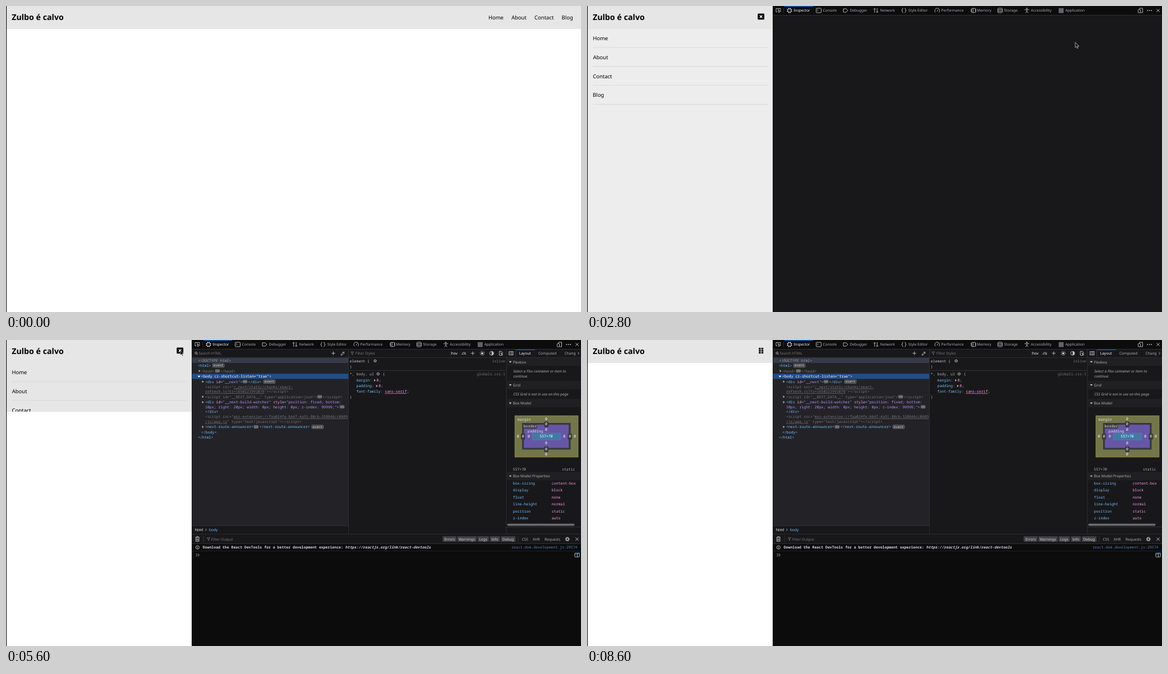
Write an HTML page that moves like this. It is 1025 by 546 pixels and loops after 8700 ms.

```html
<!DOCTYPE html>
<html lang="pt">
<head>
<meta charset="utf-8">
<title>Responsive menu</title>
<style>
html, body { margin: 0; width: 100%; height: 100%; overflow: hidden; background: #fff; }
svg { display: block; }
text { white-space: pre; text-rendering: geometricPrecision; }
.page { font: 9.48px "Noto Sans", sans-serif; fill: #000; }
.page h1, .title { font-size: 14.22px; font-weight: 700; }
.tools { font: 6.52px "Noto Sans", sans-serif; fill: #b1b1b3; }
.mono { font-family: "Noto Sans Mono", monospace; }
.ico { fill: none; stroke: #c4c4c6; stroke-width: .9; }
.fill { fill: #c4c4c6; stroke: none; }
.line { fill: none; stroke: #38383d; stroke-width: .8; }
.on { fill: #fff; }
.tag { fill: #75bfff; }
.name { fill: #ff97e9; }
.val { fill: #b98eff; }
.dim { fill: #77777b; }
.url { text-decoration: underline; }
.it { font-style: italic; }
.mid { text-anchor: middle; }
.end { text-anchor: end; }
.bar { fill: #18181a; }
.head { fill: #202023; }
.btn { fill: #414146; }
</style>
</head>
<body>
<svg width="1025" height="546" viewBox="0 0 1025 546">
<defs>
  <clipPath id="fold"><rect id="foldBox" x="1" width="330" height="546"/></clipPath>
  <g id="dots"><rect width="7.6" height="5" y="-2.5" rx="1" fill="#55555a" stroke="#a0a0a4" stroke-width=".5"/><path d="M1.6 0h4.6" stroke="#e0e0e2" stroke-width="1" stroke-dasharray="1 .8"/></g>
  <g id="event"><rect width="21" height="6.4" y="-3.2" rx="1.2" fill="#45454a" stroke="#8c8c90" stroke-width=".5"/><text class="mono" x="1.7" y="1.8" font-size="5.9" fill="#d7d7db">event</text></g>
  <path id="shut" d="M-1.4-2.2L1.6 0-1.4 2.2Z"/>
  <path id="open" d="M-2.4-1.3H2.4L0 1.7Z"/>
  <g id="gear"><circle r="2.2" fill="none" stroke="#c4c4c6" stroke-width="1.2"/><circle r="3.4" fill="none" stroke="#c4c4c6" stroke-width="1.2" stroke-dasharray="1.2 1.47"/></g>
  <path id="cross" class="ico" d="M-2.7-2.7L2.7 2.7M2.7-2.7L-2.7 2.7"/>
  <path id="plus" class="ico" d="M-3.2 0H3.2M0-3.2V3.2"/>
  <path id="funnel" d="M-2.6-2.5H2.6L.6 0V2.6L-.6 1.8V0Z" fill="none" stroke="#88888b" stroke-width=".7"/>
</defs>

<rect width="1025" height="546" fill="#fff"/>
<g class="page">
  <rect width="1024" height="41" x="1" fill="#e6e6e6"/>
  <g data-at="0 2800">
    <text x="859.9" y="24">Home</text><text x="901" y="24">About</text>
    <text x="942.1" y="24">Contact</text><text x="990.6" y="24">Blog</text>
  </g>
  <g data-at="2800 8700" clip-path="url(#fold)">
    <rect x="1" y="41" width="330" height="505" fill="#e6e6e6"/>
    <rect x="1" y="41" width="330" height="505" fill="#ededed" data-at="2800 3100"/>
    <text x="10.5" y="61">Home</text><text x="10.7" y="94.8">About</text>
    <text x="10.5" y="128.6">Contact</text><text x="10.3" y="162.4">Blog</text>
    <path d="M10.6 74H323M10.6 107.8H323M10.6 141.6H323M10.6 175.5H323" stroke="#d4d4d4" stroke-width=".8"/>
  </g>
  <text class="title" x="10.2" y="25.3">Zulbo é calvo</text>
  <g data-at="2800 4200 5600 6900">
    <rect x="304.3" y="13.6" width="11.8" height="10.7" rx="1.4"/>
    <path d="M308 16.8l4.4 4.4m0-4.4l-4.4 4.4" stroke="#fff" stroke-width="1.5"/>
  </g>
  <path data-at="4200 5600 6900 8700" d="M306.5 14h3v2.7h-3zm4.6 0h3v2.7h-3zm-4.6 3.7h3v2.7h-3zm4.6 0h3v2.7h-3zm-4.6 3.7h3v2.7h-3zm4.6 0h3v2.7h-3z" stroke="#000" stroke-width=".3" stroke-linejoin="round"/>
</g>
<rect width="1.2" height="546" fill="#1c1b22"/>

<g class="tools" data-at="2800 8700">
  <rect x="331" width="694" height="546" fill="#18181a"/>
  <rect x="331" width="694" height="16" fill="#0c0c0d"/>
  <path class="line" d="M331 16.4H1025M350.5 3V13"/>
  <rect x="352" width="51" height="1.1" fill="#0a6fd6"/>
  <text class="on" x="368.4" y="10.4">Inspector</text><text x="420.6" y="10.4">Console</text>
  <text x="468.6" y="10.4">Debugger</text><text x="522.5" y="10.4">Network</text>
  <text x="572.8" y="10.4">Style Editor</text><text x="631.6" y="10.4">Performance</text>
  <text x="695.3" y="10.4">Memory</text><text x="743.8" y="10.4">Storage</text>
  <text x="791.3" y="10.4">Accessibility</text><text x="852.7" y="10.4">Application</text>
  <g class="ico">
    <path d="M339.5 10.5H337V4.5H345V7M340.5 6.5L345.5 9 343.2 9.8 342.2 12Z"/>
    <g stroke="#fff"><rect x="358" y="5" width="6" height="6" rx="1.2"/><path d="M359.5 3.5V5M362.5 3.5V5M359.5 11V12.5M362.5 11V12.5M356.5 6.5H358M356.5 9.5H358M364 6.5H365.5M364 9.5H365.5"/></g>
    <rect x="408.5" y="4" width="9" height="8" rx="1.2"/><path d="M410.3 6l1.7 1.5-1.7 1.5"/>
    <path d="M457 5H462L465 8 462 11H457Z"/>
    <path d="M512.7 12V4.2M510.7 6.2l2-2 2 2M517.3 4V11.8M515.3 9.8l2 2 2-2"/>
    <path d="M563.7 4Q562.2 4 562.2 6T560.8 8Q562.2 8 562.2 10T563.7 12M566.3 4Q567.8 4 567.8 6T569.2 8Q567.8 8 567.8 10T566.3 12"/>
    <path d="M621.2 11.2A4.3 4.3 0 1 1 627.4 11.2M624 9.6L626 6.4"/>
    <rect x="685.5" y="4.3" width="7" height="7.4" rx="1"/><path d="M684 6H685.5M684 8H685.5M684 10H685.5M692.5 6H694M692.5 8H694M692.5 10H694M688 5V11"/>
    <rect x="732.3" y="4" width="8" height="8" rx="1.4"/><path d="M732.3 6.7H740.3M732.3 9.4H740.3"/>
    <path d="M780 6.4L784 7.1 788 6.4M784 7V9L781.8 12.4M784 9L786.2 12.4"/><circle cx="784" cy="4.6" r="1"/>
    <path d="M841.3 4.3h2v2h-2zm2.9 0h2v2h-2zm2.9 0h2v2h-2zm-5.8 2.9h2v2h-2zm2.9 0h2v2h-2zm2.9 0h2v2h-2zm-5.8 2.9h2v2h-2zm2.9 0h2v2h-2zm2.9 0h2v2h-2z" stroke-width=".6"/>
    <path d="M985 6V4H990.5V12H986.5"/><rect x="982.5" y="6.5" width="4" height="5.5" rx=".6"/>
    <path d="M998.3 8h8.8" stroke-width="1.7" stroke-dasharray="1.8 1.7"/>
  </g>
  <use href="#cross" x="1018" y="8"/>

  <g data-at="3100 8700">
    <rect x="331.8" y="31.5" width="278.4" height="514" fill="#232327"/>
    <path class="line" d="M331 31.3H892M610.4 17V546M892 17V546"/>
    <circle class="ico" cx="338.8" cy="23.3" r="1.8" stroke-width=".7"/><path class="ico" d="M340 24.7l1.6 1.6" stroke-width=".7"/>
    <text class="dim" x="343.5" y="26.2">Search HTML</text>
    <use href="#plus" x="583.5" y="23.7"/>
    <path class="ico" d="M597 27.3L597.6 25.2 600.8 22 602.3 23.5 599.1 26.7ZM600.3 20.7L603.6 24M602 22.3L603.4 20.8"/>
    <use href="#funnel" x="617.2" y="23.7"/>
    <text class="dim" x="622.8" y="26.2">Filter Styles</text>
    <text class="on" x="792" y="26.2">:hov</text><text class="on" x="810.7" y="26.2">.cls</text>
    <use href="#plus" x="832" y="23.7"/>
    <g class="ico"><circle class="fill" cx="849" cy="23.7" r="2"/><circle cx="849" cy="23.7" r="3.6" stroke-dasharray="1 1.83" stroke-width="1.5"/>
    <circle cx="865.7" cy="23.7" r="3.5"/><path class="fill" d="M865.7 20.2a3.5 3.5 0 0 1 0 7z"/>
    <path d="M879.3 20.3H883.3L885 22V27.2H879.3ZM881 23.5H883.5V27"/></g>
  </g>

  <g data-at="3300 8700">
    <g class="mono">
      <rect x="331.8" y="32" width="278.3" height="9" fill="#353b48"/>
      <rect x="331.8" y="60.2" width="278.3" height="9.2" fill="#204e8a"/>
      <text class="it" x="342" y="38.8" fill="#a0a0a4">&lt;!DOCTYPE html&gt;</text>
      <text class="tag" x="342" y="47.8">&lt;html&gt;</text><use href="#event" x="368" y="45.5"/>
      <text class="dim" x="348" y="57.5">&lt;head&gt;<tspan x="381.7">&lt;/head&gt;</tspan></text><use href="#dots" x="373" y="55.2"/>
      <text class="on" x="348" y="67.2">&lt;body cz-shortcut-listen="true"&gt;</text>
      <text class="tag" x="355" y="76.6">&lt;div <tspan class="name">id</tspan>="<tspan class="val">__next</tspan>"&gt;<tspan x="431.5">&lt;/div&gt;</tspan></text>
      <use href="#dots" x="422.2" y="74.3"/><use href="#event" x="459" y="74.3"/>
      <text class="dim" x="355" y="85.9">&lt;script src="<tspan class="url">/_next/static/chunks/react-</tspan></text>
      <text class="dim" x="355" y="94.3"><tspan class="url">refresh.js?ts=1650221991076</tspan>"&gt;&lt;/script&gt;</text>
      <text class="dim" x="355" y="103.6">&lt;script id="__NEXT_DATA__" type="application/json"&gt;<tspan x="564.5">&lt;/script&gt;</tspan></text><use href="#dots" x="555.4" y="101.3"/>
      <text class="tag" x="355" y="113.2">&lt;div <tspan class="name">id</tspan>="<tspan class="val">__next-build-watcher</tspan>" <tspan class="name">style</tspan>="<tspan class="val">position: fixed; bottom:</tspan></text>
      <text class="val" x="355" y="121.6">10px; right: 20px; width: 0px; height: 0px; z-index: 99999;<tspan class="tag">"&gt;</tspan></text><use href="#dots" x="595.3" y="119.3"/>
      <text class="tag" x="355" y="129.9">&lt;/div&gt;</text>
      <text class="dim" x="355" y="139.3">&lt;script src="<tspan class="url">moz-extension://faa024fe-bb47-4a51-80cb-320846cc0609</tspan></text>
      <text class="dim" x="355" y="147.7"><tspan class="url">/js/app.js</tspan>" type="text/javascript"&gt;&lt;/script&gt;</text>
      <text class="tag" x="355" y="157.3">&lt;next-route-announcer&gt;<tspan x="451.8">&lt;/next-route-announcer&gt;</tspan></text>
      <use href="#dots" x="442" y="155"/><use href="#event" x="545" y="155"/>
      <text class="tag" x="348" y="166.7">&lt;/body&gt;</text><text class="tag" x="342" y="175.9">&lt;/html&gt;</text>
      <use href="#shut" x="345" y="55.2"/><use href="#open" x="344" y="65" class="on"/>
      <use href="#shut" x="351" y="74.3"/><use href="#shut" x="351" y="101.3"/><use href="#shut" x="351" y="111"/><use href="#shut" x="351" y="155"/>
    </g>
    <rect class="bar" x="331.8" y="331" width="278.3" height="15"/><path class="line" d="M331 331.3H610M331 346.4H1025"/>
    <text class="on" x="337" y="341">html</text><path class="ico" d="M355.5 336.8l1.8 1.8-1.8 1.8" stroke-width=".7"/><text class="tag" x="362" y="341">body</text>

    <rect x="909" y="17" width="34" height="1" fill="#0a6fd6"/><path class="line" d="M892 31.3H1025M908.6 17V31"/>
    <g class="ico"><rect x="896.8" y="20.7" width="7.2" height="6"/><path d="M901.7 20.7V26.7M900 22.2l-1.6 1.5 1.6 1.5"/><path d="M1019.5 21.7l2 2-2 2"/></g>
    <text class="on" x="914.8" y="26.2">Layout</text><text x="949" y="26.2">Computed</text><text x="995.6" y="26.2">Chang</text>
    <path class="head" d="M892.4 31.7h133v14.3h-133zm0 41h133v15h-133zm0 32.3h133v15h-133z"/>
    <g class="ico fill"><use href="#open" x="899" y="39"/><use href="#open" x="899" y="80.4"/><use href="#open" x="899" y="112.7"/></g>
    <text x="903.8" y="41.5">Flexbox</text><text x="903.8" y="82.8">Grid</text><text x="903.8" y="115">Box Model</text>
    <g class="it"><text x="904.3" y="57.8">Select a Flex container or item to</text><text x="904.3" y="66.6">continue.</text><text x="904.3" y="99.3">CSS Grid is not in use on this page</text></g>
  </g>

  <g data-at="3500 8700">
    <g class="mono">
      <text class="on" x="612.8" y="39.8" style="fill:#c4c4c6">element {</text><use href="#gear" transform="translate(658 37.3) scale(.75)"/>
      <text class="dim end" x="890" y="39.6">inline</text>
      <text x="612.8" y="50.3">}</text><path class="line" d="M611 54.5H892"/>
      <text x="612.8" y="62.9">*, body, ul<tspan x="671.5">{</tspan></text><use href="#gear" transform="translate(663.3 60.5) scale(.75)"/>
      <text class="dim end" x="890" y="62.9" data-at="3500 3800">inline:1</text>
      <text class="dim end" x="890" y="62.9" data-at="3800 8700">globals.css:1</text>
      <text class="tag" x="624.5" y="74.4">margin<tspan fill="#b1b1b3">:</tspan><tspan class="name" x="660.5">0</tspan><tspan fill="#b1b1b3">;</tspan></text>
      <text class="tag" x="624.5" y="84.4">padding<tspan fill="#b1b1b3">:</tspan><tspan class="name" x="664.3">0</tspan><tspan fill="#b1b1b3">;</tspan></text>
      <text class="tag" x="624.5" y="94.4">font-family<tspan fill="#b1b1b3">:</tspan></text>
      <text class="name" x="675.3" y="94.4" data-at="3500 3800">sans-serif<tspan fill="#b1b1b3">;</tspan></text>
      <text class="name" x="675.3" y="94.4" data-at="3800 8700"><tspan class="url">sans-serif</tspan><tspan fill="#b1b1b3">;</tspan></text>
      <use href="#shut" x="657.5" y="72"/><use href="#shut" x="661.2" y="82"/>
      <text x="612.8" y="103.8">}</text>

      <rect x="907" y="135" width="113" height="74" fill="#73764a" stroke="#b9bb50" stroke-width=".7" stroke-dasharray="2 1.2"/>
      <rect x="920" y="148" width="86.5" height="47.5" fill="#38383d"/>
      <rect x="923.2" y="151.2" width="80" height="41.2" fill="#6657a6"/>
      <rect x="938" y="166" width="50.5" height="12.4" fill="#407aa4" stroke="#5a87c4" stroke-width=".6" stroke-dasharray="2 1.2"/>
      <path d="M922 149.5h24v8h-24zM960 146h6.3v9h-6.3zM960 190.5h6.3v9h-6.3zM918.5 167.5h6.3v9.5h-6.3zM1002 167.5h6.3v9.5h-6.3z" fill="#38383d" stroke="#38383d" stroke-linejoin="round"/>
      <g fill="#e4e4e6"><text x="911.8" y="144">margin</text><text x="922.6" y="155.5">border</text><text x="929.8" y="164.7">padding</text></g>
      <g id="sides" class="on mid"></g>
      <text x="903.5" y="233.2" data-at="3500 3800">-×-</text>
      <text x="903.5" y="233.2" data-at="3800 8700">557×70<tspan class="end" x="1014.5">static</tspan></text>
      <g id="props"></g>
    </g>
    <rect class="head" x="892.4" y="235.5" width="133" height="14.8"/>
    <use href="#open" x="899" y="243"/><text x="903.8" y="245.4">Box Model Properties</text>
    <rect class="bar" x="892.4" y="325.5" width="133" height="8"/><rect x="893.5" y="327.7" width="120" height="3.8" rx="1.9" fill="#6c6c70"/><path class="line" d="M892 333.5H1025"/>

    <rect x="331" y="346" width="694" height="200" fill="#0c0c0d"/>
    <rect class="bar" x="331" y="347.3" width="694" height="16"/><path class="line" d="M331 346.6H1025M331 363.5H1025M352 349V361"/>
    <path class="ico" d="M337.5 352.2H345M339.8 352V350.7H342.7V352M338.5 352.5V359.3H344V352.5M340.3 354V358M342.2 354V358"/>
    <use href="#funnel" x="361" y="355.3"/><text class="dim" x="365.7" y="357.7">Filter Output</text>
    <g id="filters">
      <path class="btn" d="M778.5 350.3h24.5v9.8h-24.5zm26 0h34.6v9.8h-34.6zm36.2 0h20v9.8h-20zm22 0h17.6v9.8h-17.6zm19.5 0h26v9.8h-26z"/>
      <g class="mid" fill="#d7d7db"><text x="790.7" y="357.6">Errors</text><text x="821.5" y="357.6">Warnings</text><text x="850.6" y="357.6">Logs</text><text x="871.4" y="357.6">Info</text><text x="895" y="357.6">Debug</text></g>
      <path class="line" d="M913 350V361"/>
      <text x="919.5" y="357.6">CSS</text><text x="938.8" y="357.6">XHR</text><text x="960" y="357.6">Requests</text>
      <use href="#gear" x="1000.7" y="355.3"/>
    </g>
    <use href="#cross" x="1018" y="355.3" data-at="3800 8700"/>
    <g data-at="4000 8700">
      <path class="line" d="M331 376.5H1025" stroke-opacity=".6"/>
      <circle class="ico" cx="341.4" cy="370" r="3.1" stroke-width=".7"/><path class="ico" d="M341.4 369.4V372M341.4 367.8V368.6"/>
      <text class="mono" x="350.7" y="372.3" font-weight="700" fill="#d7d7db">Download the React DevTools for a better development experience: <tspan class="it">https://reactjs.org/link/react-devtools</tspan></text>
      <text class="mono end" x="1018.5" y="372.3" style="fill:#4f86c0">react-dom.development.js:29574</text>
    </g>
    <path class="ico" data-at="3500 4000" d="M338.5 368.5l2.6 2.6-2.6 2.6m3.4-5.2l2.6 2.6-2.6 2.6"/>
    <path class="ico" data-at="4200 8700" d="M338.5 381l2.6 2.6-2.6 2.6m3.4-5.2l2.6 2.6-2.6 2.6"/>
    <g id="split" class="ico"><rect x="1013.8" y="380.3" width="8.4" height="6.8" rx="1"/><path d="M1018.5 380.3V387M1015.2 382.5H1017"/><circle cx="1021.5" cy="380.8" r="1.5" fill="#0a84ff" stroke="none"/></g>
  </g>
</g>

<g id="cursor" stroke="#fff" stroke-width=".6">
  <path id="arrow" d="M.3.3V9.6L2.5 7.7 3.9 11 5.4 10.4 4 7.2H7Z" fill="#111"/>
  <path id="hand" d="M3 7V1.3Q3.7.2 4.5 1.3V5Q5.4 4.4 6 5.2 6.9 4.7 7.5 5.5 8.7 5 9 6.2V9L8 12.5H4.2L1 8.2Q.8 7 1.8 7.2L3 8.4Z" fill="#111"/>
</g>
</svg>
<script>
const LOOP = 8700;
const el = id => document.getElementById(id);

// Box model figures: margin, border and padding on each side.
const spots = [[963, 142.8], [963, 152.3], [963, 162.4], [963, 186.3], [963, 197.3], [963, 206.4],
  ...[912.8, 921.7, 932, 995.2, 1005.2, 1014].map(x => [x, 174.4])];
const figures = (digit, size, at) => `<g data-at="${at}">` +
  [...spots.map(p => [...p, digit]), [963, 174.4, size]]
    .map(([x, y, s]) => `<text x="${x}" y="${y}">${s}</text>`).join('') + '</g>';
el('sides').innerHTML = figures('-', '-×-', '3500 3800') + figures('0', '557×70', '3800 8700');

const props = { 'box-sizing': 'content-box', display: 'block', float: 'none', 'line-height': 'normal', position: 'static', 'z-index': 'auto' };
el('props').innerHTML = Object.entries(props).map(([name, value], i) => {
  const y = 257.9 + i * 12.45;
  return `<text class="tag" x="903.8" y="${y}">${name}</text><text class="name" x="972.7" y="${y}" data-at="3800 8700">${value}</text>`;
}).join('');

const timed = [...document.querySelectorAll('[data-at]')].map(node => ({ node, at: node.dataset.at.split(' ').map(Number) }));

// Last entry whose start time has passed.
const latest = (list, t) => list.reduce((hit, item) => item[0] <= t ? item : hit);

const folds = [[0, 546], [4400, 211], [4600, 56], [4900, 41], [5600, 128], [5800, 484], [6100, 546], [6900, 230], [7100, 59], [7400, 41]];
const stops = [[2400, 945, 50], [2800, 870, 64.5], [3100, 640, 55], [3300, 420, 40], [3500, 305.3, 23],
  [3800, 305.3, 22], [4000, 310.4, 17.6], [8100, 310.2, 17], [8300, 61, 1]];
const links = [[860, 887], [901, 928], [942, 977], [991, 1011]];

function pointer(t) {
  if (t < 900 || t >= 8600) return null;
  if (t >= 2400) return latest(stops, t).slice(1);
  const tick = Math.floor(t / 100);
  if (tick < 18) {
    const p = (tick - 9) / 8, ease = p * p * (3 - 2 * p);
    return [63 + 816 * ease, 7 + 13 * p + 10 * Math.sin(Math.PI * p)];
  }
  const p = Math.min(1, (tick - 17) / 5);
  return [879 + 116 * p, 20 + p];
}

function draw() {
  const t = performance.now() % LOOP;
  for (const { node, at } of timed) {
    node.style.display = at.filter(time => time <= t).length % 2 ? '' : 'none';
  }
  el('foldBox').setAttribute('height', latest(folds, t)[1]);
  const early = t < 3800;
  el('filters').setAttribute('transform', `translate(${early ? 17.3 : 0} 0)`);
  el('split').setAttribute('transform', `translate(0 ${early ? -12.7 : 0})`);

  const at = pointer(t);
  el('cursor').style.display = at ? '' : 'none';
  if (at) {
    const over = t < 2400 && links.some(([a, b]) => at[0] + 3 >= a && at[0] + 3 <= b);
    el('cursor').setAttribute('transform', `translate(${at[0]} ${at[1]})`);
    el('hand').style.display = over ? '' : 'none';
    el('arrow').style.display = over ? 'none' : '';
  }
  requestAnimationFrame(draw);
}
draw();
</script>
</body>
</html>
```
